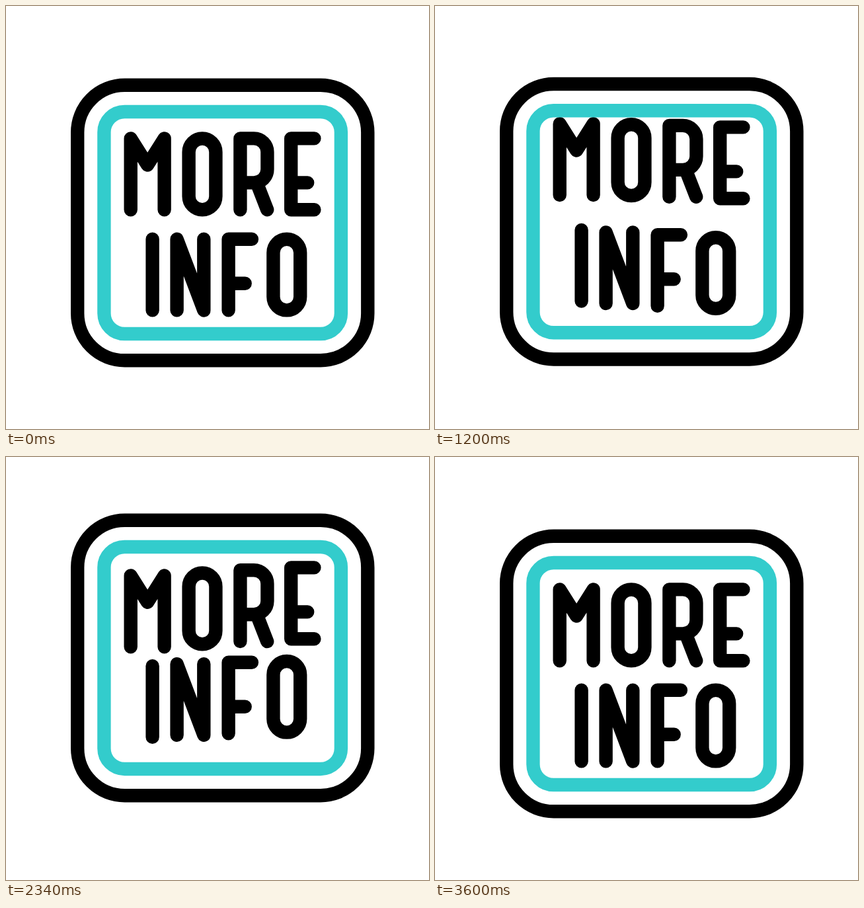
These frames come from a looping animation (640x640 px, 3620 ms). An HTML page:

```html
<!DOCTYPE html>
<html lang="en">
<head>
<meta charset="utf-8">
<title>More info</title>
<style>
  html, body { margin: 0; width: 100%; height: 100%; overflow: hidden; background: #fff; }
  svg { display: block; width: 100%; height: 100%; }
</style>
</head>
<body>
<svg viewBox="0 0 640 640" role="img" aria-label="More info" fill="none"
     stroke="#000" stroke-width="20.4" stroke-linecap="round" stroke-linejoin="round">
  <g id="badge">
    <rect x="108.2" y="119.8" width="439.1" height="416.5" rx="71.4"/>
    <g id="letters">
      <path d="M188.7 308.2V200.4L214.1 240.6L239.6 200.4V308.2"/>
      <rect x="276.6" y="200.5" width="40.8" height="107.8" rx="20.4"/>
      <path d="M354.4 308.2V200.4H375a20.4 20.4 0 0 1 20.4 20.4V247a20.4 20.4 0 0 1-20.4 20.4H354.4M379.3 267.4L395.2 308.2"/>
      <path d="M466.4 200.4H431.2V308.2H466.4M431.2 267.4H456.2"/>
      <path d="M221.6 352.8V460.4"/>
      <path d="M258.6 460.4V352.8L299.3 460.4V352.8"/>
      <path d="M336.6 460.4V352.8H371.9M336.6 419.8H361.7"/>
      <rect x="404.4" y="352.8" width="40.8" height="107.6" rx="20.4"/>
    </g>
    <rect x="148.4" y="160" width="358.5" height="336" rx="31" stroke="#33cccc"/>
  </g>
</svg>
<script>
  const LOOP = 3620, STEP = 20, LAG = 53.4;
  const TIMES = [0, 806, 1613, 2402, 3224];
  const badge = document.getElementById('badge');
  const letters = [...document.getElementById('letters').children];

  const ease = x => x * x * (3 - 2 * x);

  // Eased value at time t through the stops shared by every part
  function sway(t, stops) {
    if (t <= 0) return stops[0];
    const i = TIMES.findIndex(end => t < end);
    if (i < 0) return stops[stops.length - 1];
    const x = (t - TIMES[i - 1]) / (TIMES[i] - TIMES[i - 1]);
    return stops[i - 1] + (stops[i] - stops[i - 1]) * ease(x);
  }

  const shift = (node, y) => node.setAttribute('transform', `translate(0 ${y.toFixed(2)})`);

  function draw(t) {
    shift(badge, sway(t, [0, -51, 51, -25.4, 0]));
    letters.forEach((letter, i) => {
      const delay = (letters.length - 1 - i) * LAG;
      shift(letter, sway(t - delay, [0, -20.4, 20.4, -20.4, 0]));
    });
  }

  const start = performance.now();
  function tick(now) {
    const t = Math.max(0, now - start) % LOOP;
    draw(Math.floor(t / STEP) * STEP);
    requestAnimationFrame(tick);
  }
  draw(0);
  requestAnimationFrame(tick);
</script>
</body>
</html>
```
